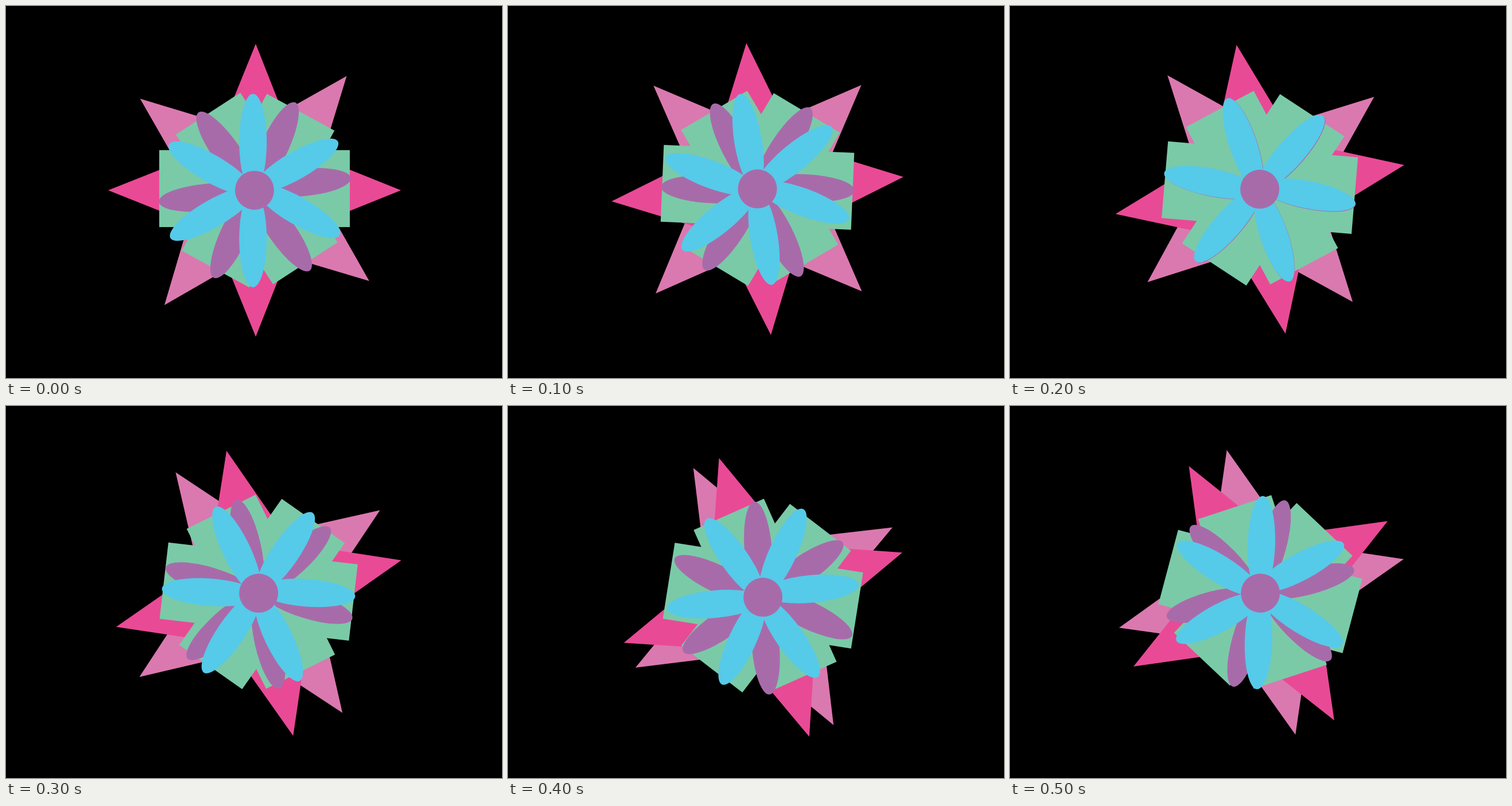
Write an HTML page with a canvas that moves like this. It is 864 px wide and 648 px high and loops after 0.6 s.

```html
<!DOCTYPE html>
<html lang="en">
<head>
<meta charset="utf-8">
<title>Spinning flower</title>
<style>
  html, body { margin: 0; height: 100%; overflow: hidden; background: #000; }
  canvas { display: block; }
</style>
</head>
<body>
<canvas id="stage" width="864" height="648"></canvas>
<script>
const ctx = document.getElementById('stage').getContext('2d');
const STEP = 100;

// Key points of the jerky drift: turn progress and the flower's centre.
const keys = [
  [0, 432.9, 320.9], [1, 434.5, 318.6], [2, 435.1, 319.1],
  [2.74, 440.1, 326.1], [3.74, 444.1, 333.1], [6.2, 436.1, 325.9]
];

// Run draw in a shifted frame turned by deg clockwise.
function place(x, y, deg, draw) {
  ctx.save();
  ctx.translate(x, y);
  ctx.rotate(deg * Math.PI / 180);
  draw();
  ctx.restore();
}

function oval(x, y, rx, ry) {
  ctx.beginPath();
  ctx.ellipse(x, y, rx, ry, 0, 0, 2 * Math.PI);
  ctx.fill();
}

// Four points, with the sideways pair a little off centre.
function star() {
  ctx.beginPath();
  for (let i = 0; i < 8; i++) {
    const r = i % 2 ? 103 : 255;
    const sin = Math.sin(i * Math.PI / 4), cos = Math.cos(i * Math.PI / 4);
    ctx.lineTo(r * sin - 2 * sin * sin, -r * cos);
  }
  ctx.fill();
}

function bars() {
  const bar = (x, y, deg, length) =>
    place(x, y, deg, () => ctx.fillRect(-length / 2, -67, length, 134));
  bar(0, 0, 0, 332);
  bar(3.8, -0.2, 57, 311);
  bar(6.2, 3.5, 118.5, 311);
}

// Three pairs of opposite petals; slip slides a pair apart sideways.
function petals() {
  const pair = (x, y, deg, slip) => place(x, y, deg, () => {
    oval(-slip, -84.4, 24, 84);
    oval(slip, 84.4, 24, 84);
  });
  pair(-2, 1.5, 0, 0);
  pair(0, 0, 60, 0);
  pair(0.6, 0, 120, 5.7);
}

function frame(now) {
  const [turn, x, y] = keys[Math.floor(now / STEP) % keys.length];
  const layer = (shape, color, dx, dy, deg) => {
    ctx.fillStyle = color;
    place(x + dx, y + dy, deg, shape);
  };
  ctx.clearRect(0, 0, 864, 648);
  layer(star, '#da79af', 1.8, 0.6, 38.5 + 6.12 * turn);
  layer(star, '#e94a96', 2.1, 0.2, -4.8 * turn);
  layer(bars, '#7acaa8', 0, -2.8, 2.4 * turn);
  layer(petals, '#a86baa', 0.1, -0.1, 8.2 * turn - 35.1);
  layer(petals, '#56cae9', -0.7, -0.9, -9.4 * turn);
  layer(() => oval(0, 0, 34, 34), '#a86baa', 0, 0, 0);
  requestAnimationFrame(frame);
}
frame(0);
</script>
</body>
</html>
```
